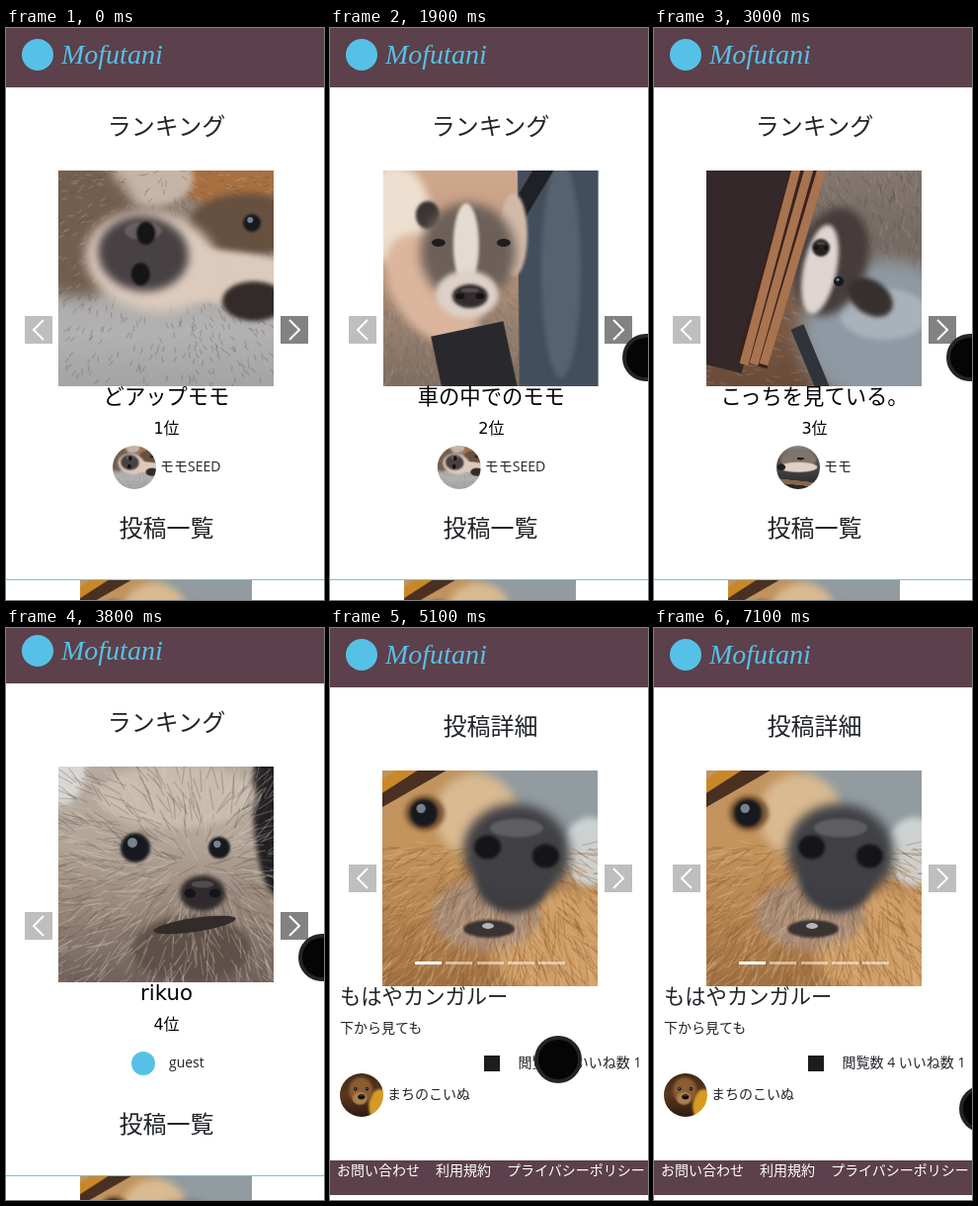
Recreate the animation shown at these times as an HTML page with a canvas. Size 322 px wide and 578 px high, loop 7.2 s.

```html
<!DOCTYPE html>
<html lang="ja">
<head>
<meta charset="utf-8">
<title>Dog ranking</title>
<style>
html, body { margin: 0; width: 100%; height: 100%; overflow: hidden; background: #fff; }
#stage { position: relative; width: 322px; height: 578px; overflow: hidden; background: #fff; }
#stage div, #stage canvas, #stage svg, #stage span { position: absolute; }
.page { left: 0; top: 0; width: 322px; height: 820px; background: #fff; }
.clip { left: 0; top: 140px; width: 322px; height: 336px; overflow: hidden; }
.item { left: 0; top: -140px; width: 322px; height: 480px; }
span { white-space: pre; line-height: 1; color: #212529;
  font-family: "DejaVu Sans", "Noto Sans CJK JP", "Noto Sans CJK", sans-serif; }
.head { font-weight: 300; }
.user { font-family: "Open Sans", "Noto Sans CJK JP", "Noto Sans CJK", sans-serif; }
.brand { font-family: "Liberation Serif", serif; font-style: italic; }
.round { border-radius: 50%; }
</style>
</head>
<body>
<div id="stage"></div>
<script>
const LOOP = 7200, W = 322, PHOTO = 218;
const CYAN = '#56c1e6', PLUM = '#5c404b', PALE = '#bebebe', BLACK = '#000';
const stage = document.getElementById('stage');

// ---- page parts ----

function add(parent, tag, cls, css) {
  const el = document.createElement(tag);
  el.className = cls;
  Object.assign(el.style, css);
  parent.append(el);
  return el;
}

const place = (x, y, w, h) => ({ left: `${x}px`, top: `${y}px`, width: `${w}px`, height: `${h}px` });

const box = (parent, x, y, w, h, background, cls = '') =>
  add(parent, 'div', cls, { ...place(x, y, w, h), background });

const disc = (parent, x, y, r, color) => box(parent, x - r, y - r, 2 * r, 2 * r, color, 'round');

// y is the middle of the line; shift -50 centres the text on x
function text(parent, str, x, y, size, { shift = 0, color = '', cls = '' } = {}) {
  add(parent, 'span', cls, {
    left: `${x}px`, top: `${y}px`, fontSize: `${size}px`, color,
    transform: `translate(${shift}%, -50%)`
  }).textContent = str;
}

const centred = (parent, str, y, size, style) =>
  text(parent, str, 162.5, y, size, { shift: -50, color: BLACK, ...style });
const heading = (parent, str, y) => centred(parent, str, y, 24, { color: '', cls: 'head' });
const user = (parent, name, x, y) => text(parent, name, x, y, 14, { cls: 'user' });

function outline(parent, x, y, size, d, stroke, width) {
  const ns = 'http://www.w3.org/2000/svg';
  const el = document.createElementNS(ns, 'svg');
  const path = document.createElementNS(ns, 'path');
  el.setAttribute('viewBox', '0 0 28 28');
  Object.assign(el.style, place(x, y, size, size));
  const attrs = { d, stroke, fill: 'none', 'stroke-width': width };
  for (const k in attrs) path.setAttribute(k, attrs[k]);
  el.append(path);
  parent.append(el);
}

function arrows(parent, y, rightColor) {
  const chevron = (x, color, dir) => outline(box(parent, x, y, 28, 28, color), 0, 0, 28,
    `M${14 - 5 * dir} 4 l${10 * dir} 10 l${-10 * dir} 10`, '#fff', 2);
  chevron(19, PALE, -1);
  chevron(278, rightColor, 1);
}

// ---- photos, painted as soft shapes on a 218 px square ----

function painter(ctx) {
  let seed = 7;
  const rnd = () => (seed = (seed * 16807) % 2147483647) / 2147483647;
  const p = {
    base(...colors) {
      const g = ctx.createLinearGradient(0, 0, 0, PHOTO);
      colors.forEach((c, i) => g.addColorStop(i / (colors.length - 1), c));
      ctx.fillStyle = g;
      ctx.fillRect(0, 0, PHOTO, PHOTO);
    },
    oval(color, x, y, rx, ry = rx, turn = 0) {
      ctx.filter = `blur(${Math.min(rx, ry) / 9}px)`;
      ctx.fillStyle = color;
      ctx.beginPath();
      ctx.ellipse(x, y, rx, ry, turn, 0, 7);
      ctx.fill();
      ctx.filter = 'none';
    },
    band(color, x0, y0, x1, y1, width) {
      ctx.strokeStyle = color;
      ctx.lineWidth = width;
      ctx.beginPath();
      ctx.moveTo(x0, y0);
      ctx.lineTo(x1, y1);
      ctx.stroke();
    },
    // hairs below `top` that point away from (cx, cy)
    fur(light, dark, cx, cy, top, len) {
      ctx.globalAlpha = 0.28;
      for (let i = 0; i < 900; i++) {
        const x = rnd() * PHOTO, y = top + rnd() * (PHOTO - top);
        const a = Math.atan2(y - cy, x - cx) + rnd() - 0.5;
        p.band(i % 2 ? light : dark, x, y, x + len * Math.cos(a), y + len * Math.sin(a), 1.3);
      }
      ctx.globalAlpha = 1;
    },
    eye(x, y, r) {
      p.oval('#17191e', x, y, r);
      p.oval('#75828c', x - r / 5, y - r / 3, r / 3);
    },
    nose(color, x, y, rx, ry, turn = 0) {
      p.oval(color, x, y, rx, ry, turn);
      p.oval('#ffffff28', x, y - ry / 2, rx / 2, ry / 5);
      for (const side of [-0.55, 0.55]) {
        p.oval('#151416', x + side * rx * Math.cos(turn), y + side * rx * Math.sin(turn), rx / 4, ry / 4);
      }
    }
  };
  return p;
}

const photos = {
  closeUp(p) {
    p.base('#8d7869', '#94847a', '#a9a7a7', '#b3b2b2', '#a3a2a4');
    p.oval('#a96f40', 185, 5, 65, 35);
    p.oval('#c5b5a6', 95, 8, 42, 28);
    p.oval('#735e4f', 20, 60, 60, 68);
    p.fur('#c0b3a8', '#5f544e', 109, 0, 0, 6);
    p.oval('#66503f', 190, 55, 58, 32);
    p.oval('#dccabd', 170, 108, 90, 27, 0.1);
    p.oval('#dccabd', 95, 92, 68, 50, 0.2);
    p.oval('#332b29', 198, 132, 32, 20);
    p.nose('#484143', 86, 84, 38, 46, 1.7);
    p.eye(196, 53, 9);
  },
  inCar(p) {
    p.base('#cfa98e', '#c39b82', '#9c8371', '#7d6d60');
    p.oval('#eee0d0', 12, 45, 36, 50);
    p.fur('#b79d85', '#6c6a6a', 0, 0, 120, 6);
    p.oval('#dbb59d', 50, 120, 40, 62, -0.6);
    p.band('#29292d', 85, 160, 100, 230, 75);
    p.band('#434e5c', 178, -10, 180, 230, 84);
    p.oval('#566270', 180, 100, 20, 110);
    p.band('#1f2126', 165, -5, 135, 45, 18);
    p.oval('#3b3534', 45, 45, 12, 14);
    p.oval('#d2baa9', 132, 65, 14, 42);
    p.oval('#6c6059', 86, 83, 48, 50);
    p.oval('#e5dad1', 84, 75, 13, 42);
    p.oval('#ddd0c6', 85, 125, 32, 24);
    p.nose('#342d2e', 88, 127, 18, 12);
    p.oval('#211b1b', 56, 73, 7, 4);
    p.oval('#211b1b', 122, 73, 7, 4);
  },
  byDoor(p) {
    p.base('#83776e', '#756a63', '#7a5c48', '#6b4a38');
    p.fur('#a4978b', '#544b47', 218, 218, 0, 8);
    p.oval('#8f99a3', 180, 165, 85, 76);
    p.oval('#a9b1b9', 180, 145, 45, 26);
    p.band('#30343a', 92, 158, 122, 230, 14);
    p.oval('#453c3b', 127, 92, 36, 56, 0.3);
    p.oval('#38302f', 166, 128, 25, 17, 0.6);
    p.oval('#ded5d0', 115, 100, 17, 46, 0.2);
    p.nose('#252020', 116, 78, 9, 9);
    p.eye(134, 112, 5);
    p.band('#35282b', 43, -10, -8, 194, 90);
    p.band('#38231d', 102, -5, 46, 196, 32);
    for (let i = 0; i < 3; i++) p.band('#a8734f', 92 + 13 * i, -5, 38 + 10 * i, 196, 9);
  },
  shaggy(p) {
    p.base('#b5a99d', '#b3a699', '#978679', '#6f6159');
    p.oval('#d9d8d6', 0, 0, 28, 40);
    p.oval('#211f22', 222, 30, 25, 100);
    p.oval('#c8bcae', 120, 30, 80, 32);
    p.oval('#5f5149', 135, 185, 60, 35);
    p.fur('#dccfc1', '#64574e', 145, 100, 12, 22);
    p.eye(78, 82, 15);
    p.eye(163, 82, 11);
    p.oval('#332b29', 138, 160, 42, 7, -0.15);
    p.nose('#302a2c', 146, 128, 23, 18);
  },
  bigNose(p) {
    p.base('#c0935f', '#c4945d', '#b5834f', '#a07043');
    p.oval('#929b9f', 185, 20, 90, 80);
    p.oval('#cdd1d2', 210, 82, 28, 35);
    p.band('#4a3020', -10, 30, 60, -10, 22);
    p.band('#c98828', -10, 22, 40, -10, 12);
    p.oval('#d9ba91', 95, 45, 42, 42);
    p.oval('#cf9e66', 190, 180, 80, 55);
    p.oval('#a48a77', 105, 145, 55, 36);
    p.fur('#e3bf8e', '#85552b', 130, 60, 75, 18);
    p.oval('#3b3331', 108, 160, 26, 9);
    p.oval('#b6b4bb', 107, 157, 6, 3);
    p.oval('#7a5533', 43, 43, 20, 18);
    p.eye(42, 43, 14);
    p.oval('#3b3b40', 132, 112, 36, 32);
    p.nose('#404045', 136, 82, 54, 48, 0.15);
  },
  napping(p) {
    p.base('#8a8783', '#5b504b', '#3b3a3d', '#222328');
    p.oval('#82746a', 110, 70, 90, 45);
    p.oval('#ddd2c4', 110, 108, 95, 25);
    p.oval('#211d1e', 25, 108, 20, 16);
    p.oval('#211d1e', 120, 65, 18, 7);
    p.band('#8a6548', 0, 175, 218, 198, 22);
  },
  brownPup(p) {
    p.base('#422a17', '#5a3720', '#2d1c12');
    p.oval('#d79a25', 200, 165, 55, 85);
    p.oval('#8a5d33', 105, 85, 60, 65);
    p.oval('#a9804f', 100, 125, 36, 32);
    p.nose('#17100c', 108, 118, 18, 13);
    for (const x of [78, 136]) p.eye(x, 78, 9);
  }
};

function photo(parent, name, x, y, size, cls = '') {
  const c = add(parent, 'canvas', cls, place(x, y, size, size));
  c.width = c.height = PHOTO;
  photos[name](painter(c.getContext('2d')));
}

const avatar = (parent, name, x, y, r = 22) => photo(parent, name, x - r, y - r, 2 * r, 'round');

// ---- pages ----

function page() {
  const el = add(stage, 'div', 'page', {});
  box(el, 0, 0, W, 60, PLUM);
  disc(el, 32, 27, 16, CYAN);
  text(el, 'Mofutani', 56, 27, 28, { color: CYAN, cls: 'brand' });
  return el;
}

const ranking = page();
heading(ranking, 'ランキング', 100);
const clip = add(ranking, 'div', 'clip', {});
const items = [
  { pic: 'closeUp', title: 'どアップモモ', name: 'モモSEED', face: 'closeUp', x: 130 },
  { pic: 'inCar', title: '車の中でのモモ', name: 'モモSEED', face: 'closeUp', x: 130 },
  { pic: 'byDoor', title: 'こっちを見ている。', name: 'モモ', face: 'napping', x: 146 },
  { pic: 'shaggy', title: 'rikuo', name: 'guest', x: 139 }
].map(({ pic, title, name, face, x }, i) => {
  const el = add(clip, 'div', 'item', {});
  photo(el, pic, 53, 144, PHOTO);
  centred(el, title, 373, 21.3);
  centred(el, `${i + 1}位`, 404.5, 16);
  if (face) avatar(el, face, x, 444);
  else disc(el, x, 444, 12, CYAN);
  user(el, name, x + 26, 443);
  return el;
});
arrows(ranking, 291, '#828282');
heading(ranking, '投稿一覧', 506);
box(ranking, 0, 557, W, 1, '#6cc4e4');
photo(ranking, 'bigNose', 75, 558, 174);
centred(ranking, 'もはやカンガルー', 742, 14);
outline(ranking, 154, 753, 16, 'M14 25 C-6 12 5 -2 14 7 C23 -2 34 12 14 25 Z', '#3f7fb0', 2.2);
avatar(ranking, 'brownPup', 118, 795, 21);
user(ranking, 'まちのこいぬ', 145, 794);

const detail = page();
heading(detail, '投稿詳細', 100);
photo(detail, 'bigNose', 53, 144, PHOTO);
for (let i = 0; i < 5; i++) box(detail, 86 + 31.3 * i, 336.5, 27, 3, i ? '#ffffff80' : '#fff');
arrows(detail, 239, PALE);
text(detail, 'もはやカンガルー', 10, 373, 21.3, { cls: 'head' });
text(detail, '下から見ても', 10, 404, 14);
box(detail, 156, 432, 16, 16, '#1d1d1f');
text(detail, '閲覧数 4 いいね数 1', 315.5, 439, 14, { shift: -100, cls: 'user' });
avatar(detail, 'brownPup', 32, 472);
user(detail, 'まちのこいぬ', 58, 471);
box(detail, 0, 538, W, 35, PLUM);
let linkX = 7;
for (const link of ['お問い合わせ', '利用規約', 'プライバシーポリシー']) {
  text(detail, link, linkX, 548, 14, { color: '#fff' });
  linkX += 14 * link.length + 16;
}

const pointer = disc(stage, 0, 0, 24, '#242424');
disc(pointer, 24, 24, 20, '#050505');

// ---- motion ----

const ease = (t, from, ms) => {
  const k = Math.min(1, Math.max(0, (t - from) / ms));
  return (1 - Math.cos(Math.PI * k)) / 2;
};
const FIRST_SLIDE = 1320, SLIDE_EVERY = 860, SLIDE_MS = 600;
const SCROLL = 236, OPEN = 4700;
const hidden = { x: 354, y: 353 };
const stops = [
  { at: 150, ms: 550, x: 320, y: 333 },
  { at: 3830, ms: 550, x: 231, y: 436 },
  { at: 5150, ms: 350, x: 338, y: 430 },
  { at: 5880, ms: 1200, x: 333, y: 486 }
];

function pointerAt(t) {
  return stops.reduce((from, to) => {
    const k = ease(t, to.at, to.ms);
    return { x: from.x + (to.x - from.x) * k, y: from.y + (to.y - from.y) * k };
  }, hidden);
}

function draw(t) {
  let pos = 0;
  for (let i = 0; i < items.length - 1; i++) pos += ease(t, FIRST_SLIDE + SLIDE_EVERY * i, SLIDE_MS);
  items.forEach((el, i) => { el.style.transform = `translateX(${(i - pos) * W}px)`; });
  ranking.style.transform = `translateY(${-Math.round(SCROLL * ease(t, 3752, 588))}px)`;
  detail.style.visibility = t >= OPEN ? 'visible' : 'hidden';
  const { x, y } = pointerAt(t);
  pointer.style.transform = `translate(${x}px, ${y}px)`;
}

const start = performance.now();
function tick() {
  draw((performance.now() - start) % LOOP);
  requestAnimationFrame(tick);
}
tick();
</script>
</body>
</html>
```
